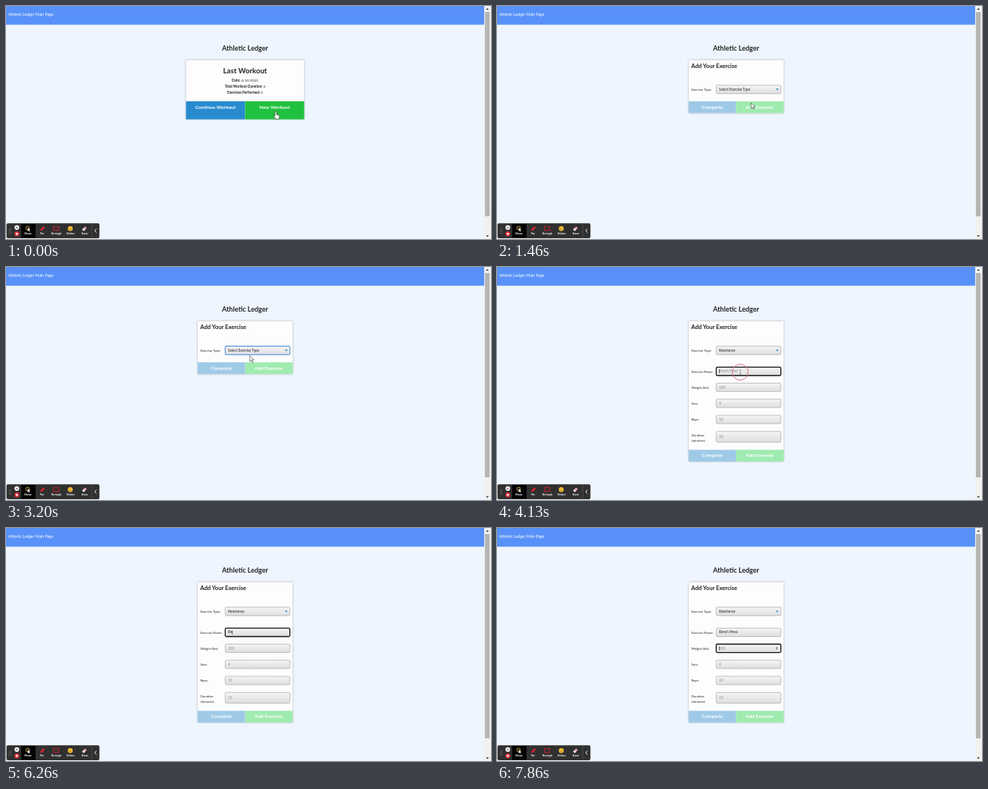
These frames come from a looping animation (640 by 308 pixels, 8000 ms). An HTML page:

```html
<!DOCTYPE html>
<html lang="en">
<head>
<meta charset="utf-8">
<title>Workout form</title>
<style>
html, body { margin: 0; height: 100%; overflow: hidden; background: #eef5fe; }
svg { display: block; width: 100vw; height: 100vh; font-family: Lato, sans-serif; fill: #222; }
.mid { text-anchor: middle; }
.b { font-weight: 700; }
.btn { font-size: 6.45px; font-weight: 700; fill: #fff; text-anchor: middle; }
.info { font-size: 4.6px; text-anchor: middle; }
.label { font-size: 4.35px; }
.value { font-size: 4.65px; }
.tool { font-size: 3.1px; font-weight: 700; fill: #fff; text-anchor: middle; }
.card { fill: #fdfdfe; filter: drop-shadow(0 .5px .8px #0005); }
.box { fill: url(#field); stroke: #aaa; stroke-width: .7; }
</style>
</head>
<body>
<svg viewBox="0 0 640 308" preserveAspectRatio="none">
  <defs>
    <linearGradient id="field" x2="0" y2="1">
      <stop stop-color="#f5f5f5"/><stop offset="1" stop-color="#dedede"/>
    </linearGradient>
  </defs>
  <rect width="640" height="308" fill="#eef5fe"/>
  <rect width="631" height="24.7" fill="#5892f8"/>
  <text x="3" y="13.2" font-size="5.2" fill="#fff">Athletic Ledger Main Page</text>
  <text x="315.5" y="59.2" font-size="9" class="mid b">Athletic Ledger</text>

  <g id="home">
    <rect class="card" x="237.5" y="71.5" width="156" height="78.3" rx=".8"/>
    <text x="315.5" y="88.6" font-size="9.6" class="mid b">Last Workout</text>
    <text x="315.5" y="100" class="info"><tspan class="b">Date:</tspan> 4/10/2021</text>
    <text x="315.5" y="107.8" class="info"><tspan class="b">Total Workout Duration:</tspan> 0</text>
    <text x="315.5" y="115.5" class="info"><tspan class="b">Exercises Performed:</tspan> 0</text>
    <rect x="237.5" y="126" width="78" height="23.8" fill="#288bd0"/>
    <rect id="newBtn" x="315.5" y="126" width="78" height="23.8"/>
    <text x="276.5" y="135.8" class="btn">Continue Workout</text>
    <text x="354.5" y="135.8" class="btn">New Workout</text>
  </g>

  <g id="form">
    <rect id="card" class="card" x="253" y="71.5" width="125.3" height="70" rx=".8"/>
    <text x="256.3" y="82.4" font-size="7.65" class="b">Add Your Exercise</text>
    <text x="256.5" y="111.8" class="label">Exercise Type:</text>
    <rect id="select" class="box" x="289.3" y="104.7" width="85.3" height="11.2" rx="1.5"/>
    <text id="type" x="293" y="111.7" class="value"></text>
    <path d="M367.9 109.3h3.8l-1.9 2.2z" fill="#2a8bb8"/>
    <g id="fields"></g>
    <g id="buttons">
      <rect x="253" y="126" width="62.6" height="15.5" fill="#9fcae7"/>
      <rect x="315.6" y="126" width="62.7" height="15.5" fill="#a0ebb0"/>
      <text x="284.2" y="135.5" class="btn">Complete</text>
      <text x="346.5" y="135.5" class="btn">Add Exercise</text>
    </g>
    <path id="spinner" d="M367.9 158.5l1.1-1.5 1.1 1.5zM367.9 159.6h2.2l-1.1 1.5z" fill="#333"/>
    <rect id="caret" width=".6" height="5" fill="#111"/>
  </g>

  <rect x="631" width="9" height="308" fill="#f1f1f1"/>
  <rect x="632" y="8" width="6.2" height="270" fill="#b5b5b5"/>
  <path d="M633.3 5l1.9-2.4 1.9 2.4zM633.3 303l1.9 2.4 1.9-2.4z" fill="#505050"/>

  <circle id="ring" fill="none" stroke="#dc6a78"/>
  <path id="hand" d="M-1 1q0-1.2 1-1.2t1 1.2v3l3 .8q1 .3.9 1.5l-.5 2.5-.6 1.2h-4l-2.6-3.8q-.4-1 .5-1l1.3 1z" fill="#fff" stroke="#222" stroke-width=".55"/>
  <path id="arrow" d="M0 0v7.6l1.8-1.7 1.2 2.8 1.2-.5-1.2-2.7h2.4z" fill="#fff" stroke="#222" stroke-width=".55"/>
  <path id="beam" d="M-1-3h2M0-3v6M-1 3h2" fill="none" stroke="#555" stroke-width=".5"/>

  <g id="toolbar">
    <rect x=".7" y="287.3" width="122.6" height="19.8" rx="2" fill="#303030"/>
    <path d="M4.5 294v7M6.4 294v7" stroke="#999" stroke-width=".8" stroke-dasharray=".8 1.2"/>
    <rect x="20" y="288" width="19" height="18.4" fill="#050505"/>
    <circle cx="14.3" cy="292.8" r="3.1" fill="#f4f4f4"/>
    <path d="M13.3 291.8l2 2M15.3 291.8l-2 2" stroke="#333" stroke-width=".7"/>
    <circle cx="14.3" cy="301.2" r="3.1" fill="#e8303c"/>
    <rect x="13.1" y="300" width="2.4" height="2.4" fill="#fff"/>
    <circle cx="28.6" cy="293.6" r="2.5" fill="none" stroke="#e9b94c" stroke-width=".8"/>
    <path d="M28.7 292.7v5l1.1-1 .8 1.5.8-.5-.8-1.5h1.5z" fill="#fff"/>
    <path d="M45.3 297.3l.5-2.3 3.7-3.7 1.7 1.7-3.7 3.7z" fill="#e6202e"/>
    <rect x="62.7" y="291.7" width="7" height="5" fill="none" stroke="#d81f2b" stroke-width=".9"/>
    <circle cx="84.8" cy="294.2" r="3.2" fill="#f6c338"/>
    <path d="M83.5 293.2h.5M85.6 293.2h.5M83 294.8q1.8 2.4 3.6 0" fill="none" stroke="#7a4a10" stroke-width=".6"/>
    <path d="M100.5 295.4l3.8-4 2.3 2-3.8 4z" fill="#e7a9b4"/>
    <path d="M100.5 295.4l1.4-1.5 2.3 2-1.4 1.5z" fill="#f5f5f5"/>
    <path d="M113.2 288v18.4" stroke="#666" stroke-width=".5"/>
    <path d="M119.3 294.5l-2.2 2.5 2.2 2.5" fill="none" stroke="#fff" stroke-width=".9"/>
  </g>
</svg>
<script>
const LOOP = 8000;
const el = id => document.getElementById(id);
const show = (id, on) => el(id).style.display = on ? '' : 'none';
const attrs = (id, values) => {
  for (const key in values) el(id).setAttribute(key, values[key]);
};

// label, hint, top, height
const rows = [
  ['Exercise Name:', 'Bench Press', 132.4, 11.1],
  ['Weight (lbs):', '200', 153.5, 11.1],
  ['Sets:', '4', 174.7, 11.1],
  ['Reps:', '10', 196, 11.1],
  ['Duration', '10', 217.3, 14.2]
];
el('fields').innerHTML = rows.map(([label, hint, y, h], i) => `
  <text x="256.5" y="${i < 4 ? y + 7.3 : 224.3}" class="label">${label}</text>
  <rect id="box${i}" class="box" x="289.3" y="${y}" width="85.3" height="${h}" rx="1.5"/>
  <text id="value${i}" x="293" y="${y + h / 2 + 1.5}" class="value" fill="#888">${hint}</text>
`).join('') + '<text x="256.5" y="230.5" class="label">(minutes):</text>';

[['Mouse', 29], ['Pen', 47.5], ['Rectangle', 66.5], ['Stickers', 85.3], ['Eraser', 104]].forEach(([name, x]) =>
  el('toolbar').insertAdjacentHTML('beforeend', `<text x="${x}" y="302.2" class="tool">${name}</text>`));

// time, x, y of the pointer tip
const path = [
  [0, 356, 139.5], [450, 356, 139.5], [900, 351, 150], [1130, 351, 150],
  [1750, 322.5, 110], [2660, 322.5, 110], [3130, 321.7, 116.5],
  [3330, 321.7, 119], [3500, 321.7, 119], [3930, 321, 139], [8000, 321, 139]
];
function pointer(t) {
  const i = path.findIndex(p => p[0] > t);
  const [t0, x0, y0] = path[i - 1], [t1, x1, y1] = path[i];
  const u = (t - t0) / (t1 - t0), k = u * u * (3 - 2 * u);
  return [x0 + (x1 - x0) * k, y0 + (y1 - y0) * k];
}

const clicks = [[250, 356, 140], [2420, 322.5, 110], [4000, 321, 139]];
const keys = [6130, 6240, 6400, 6490, 6580, 6680, 6770, 6860, 6950, 7050, 7150];

function draw(t) {
  const open = t >= 3460, field = t >= 7730 ? 1 : t >= 4060 ? 0 : -1;
  show('home', t < 1130);
  show('form', t >= 1130);
  attrs('newBtn', { fill: t < 400 ? '#20c13f' : '#23a43a' });

  const focused = t >= 2660 && t < 4060;
  attrs('select', { style: focused ? 'stroke:#5b9be0;stroke-width:1.2' : '' });
  el('type').textContent = open ? 'Resistance' : 'Select Exercise Type';
  attrs('card', { height: open ? 185.6 : 70 });
  attrs('buttons', { transform: `translate(0 ${open ? 115.6 : 0})` });
  show('fields', open);
  rows.forEach((_, i) => attrs('box' + i, { style: i === field ? 'stroke:#111;stroke-width:1.3' : '' }));

  const typed = keys.filter(k => k <= t).length;
  el('value0').textContent = typed ? rows[0][1].slice(0, typed) : rows[0][1];
  attrs('value0', { fill: typed ? '#222' : '#888' });
  show('spinner', field === 1);

  const last = field === 1 ? 7730 : typed ? keys[typed - 1] : 4060;
  show('caret', field >= 0 && (t - last) % 1060 < 530);
  const width = field === 0 && typed ? el('value0').getComputedTextLength() : 0;
  attrs('caret', { x: 293 + width, y: field === 1 ? 156.5 : 135.4 });

  const [x, y] = pointer(t);
  for (const id of ['hand', 'arrow', 'beam']) attrs(id, { transform: `translate(${x} ${y})` });
  show('hand', t < 1130);
  show('arrow', t >= 1130 && t < 3850);
  show('beam', t >= 3850 && t < 6130);

  const click = clicks.find(c => t >= c[0] && t < c[0] + 240);
  show('ring', click);
  if (click) {
    const u = (t - click[0]) / 240;
    attrs('ring', { cx: click[1], cy: click[2], r: 5 + 10 * u, opacity: Math.min(1, 2 * (1 - u)) });
  }
}

function tick() {
  draw(performance.now() % LOOP);
  requestAnimationFrame(tick);
}
tick();
</script>
</body>
</html>
```
